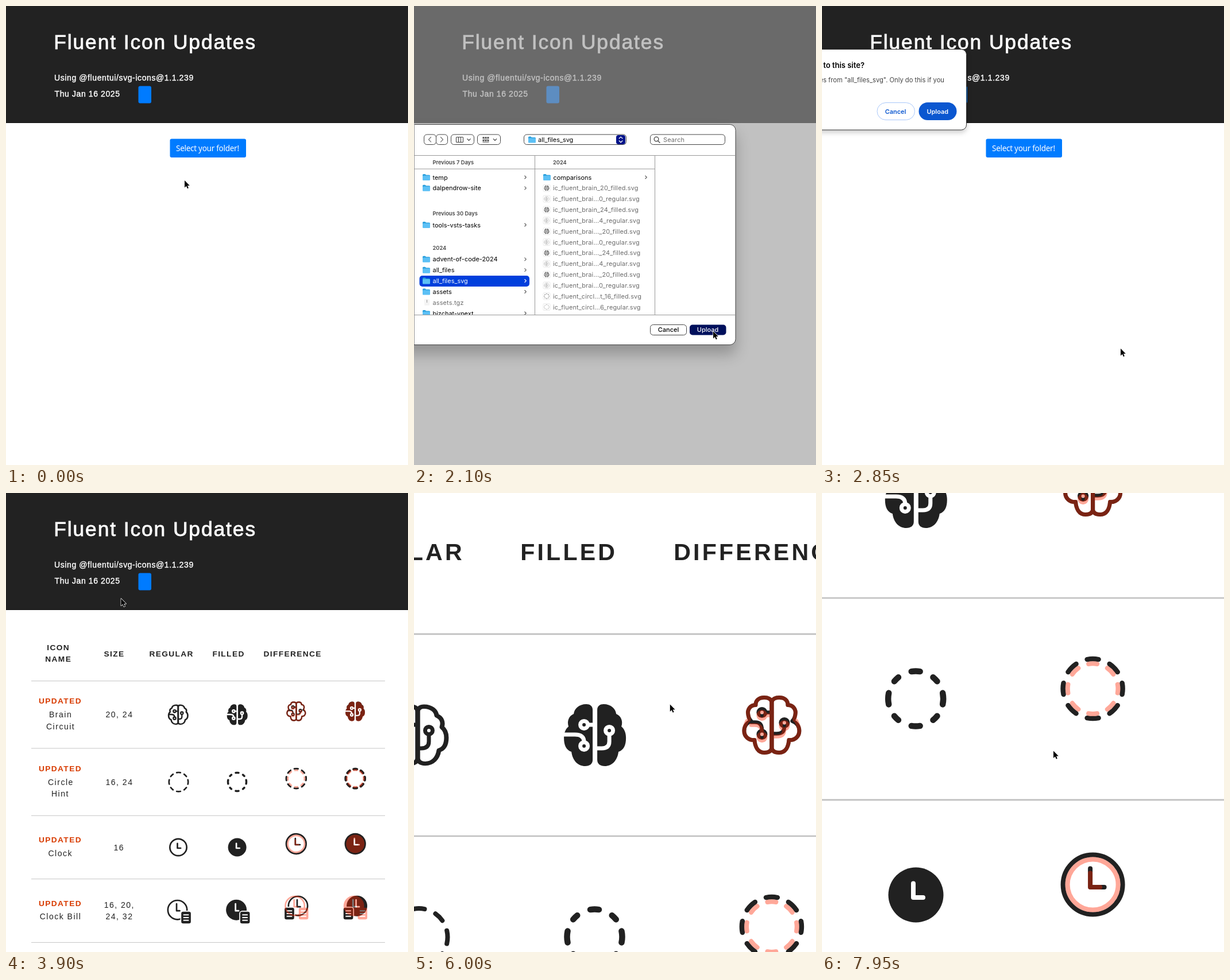
Write an HTML page that moves like this. It is 700 px wide and 800 px high and loops after 8000 ms.

```html
<!DOCTYPE html>
<html lang="en">
<head>
<meta charset="utf-8">
<title>Icon updates</title>
<style>
html, body { margin: 0; width: 100%; height: 100%; overflow: hidden; background: #fff; }
svg { display: block; width: 700px; height: 800px; }
text { white-space: pre; }
.page { font: 14px "Liberation Sans", Arial, sans-serif; letter-spacing: 1.5px; fill: #222; }
.page .b { font-size: 13.7px; font-weight: 700; letter-spacing: 1.4px; }
.page .head { fill: #fff; stroke: #fff; stroke-width: .4; letter-spacing: .6px; }
.page .title { font-size: 35.4px; letter-spacing: 1.9px; stroke-width: .8; }
.page .btn { font: 13.5px "Noto Sans", sans-serif; letter-spacing: -.27px; fill: #fff; }
.ui { font: 10.95px Inter, sans-serif; fill: #000; }
.ui .group { font-size: 9.3px; font-weight: 600; fill: #444; }
.ui .dim { fill: #6c6c6c; letter-spacing: .14px; }
.ui .mid { font-weight: 500; text-anchor: middle; }
.ui .end { text-anchor: end; }
.box { fill: #fff; stroke: #444; }
.line { fill: none; stroke: #444; stroke-width: 1.3; stroke-linecap: round; stroke-linejoin: round; }
</style>
</head>
<body>
<svg id="stage" viewBox="0 0 700 800" xmlns="http://www.w3.org/2000/svg"></svg>
<script>
const INK = '#212121', RED = '#ff2600', BLUE = '#007bff', ACCENT = '#003fdc';
const LOOP = 8000, STEP = 150;

const text = (x, y, s, cls = '') => `<text x="${x}" y="${y}" class="${cls}">${s}</text>`;
const rect = (x, y, w, h, r, attrs) =>
  `<rect x="${x}" y="${y}" width="${w}" height="${h}" rx="${r}" ${attrs}/>`;
const path = (d, attrs) => `<path d="${d}" ${attrs}/>`;
const stroke = (color, w) =>
  `fill="none" stroke="${color}" stroke-width="${w}" stroke-linecap="round" stroke-linejoin="round"`;
const move = (x, y, body, s = 1) => `<g transform="translate(${x} ${y}) scale(${s})">${body}</g>`;
const mirrored = half => half + `<g transform="scale(-1 1)">${half}</g>`;

// Icons are drawn around 0,0 at three times their size on the page.
const LOBE = 'M-4-44C-4-51-9-54-15-54C-28-54-36-46-37-37C-46-33-49-24-46-15C-52-10-54-3-54 5' +
  'C-54 18-50 26-41 29C-39 44-30 54-17 54C-9 54-4 50-4 43Z';

function circuit(color, right = 25) {
  const ring = (x, y) => `<circle cx="${x}" cy="${y}" r="6.5"/>`;
  return `<g fill="none" stroke="${color}" stroke-width="7">` +
    ring(-19, -18) + ring(-19, 19) + ring(right, -8) +
    `<path d="M-12-18h9M-56-1h21q16 0 16 13M${right}-1v12q0 12-13 12H0"/></g>`;
}
const brainFilled = color =>
  `<g fill="${color}">${mirrored(path(LOBE, ''))}</g>` + circuit('#fff');
const brainRegular = color =>
  mirrored(path(LOBE, `transform="translate(4 0) scale(1 .92)" ${stroke(color, 8)}`)) +
  `<clipPath id="inside"><path d="M-52-60H60V60H-52Z"/></clipPath><g clip-path="url(#inside)">${circuit(color, 19.5)}</g>`;

// Deeply lobed outline: notch is the depth between the side lobes, drop lowers the circuit.
function brainLobed(color, notch, drop) {
  const half = `M0-40C-1-46-7-48-13-48C-22-48-28-43-28-35C-38-35-43-26-41-18C-40-12-38-9 ${-notch}-7` +
    'C-44-4-48 3-48 10C-48 20-40 27-30 26C-29 38-24 48-13 48C-6 48-1 46 0 40Z';
  const ring = (x, y) => `<circle cx="${x}" cy="${y}" r="6.3"/>`;
  return mirrored(path(half, stroke(color, 7))) +
    `<g transform="translate(0 ${drop})" ${stroke(color, 6.5)}>` +
    ring(-17, -22) + ring(-17, 16) + ring(22, -4) +
    '<path d="M-10-22H0M-36-5h7q12 0 12 13M22 3q0 12-13 12H0"/></g>';
}

// lens: lengths of the side, diagonal and top dashes.
function hint(color, r, w, ...lens) {
  let d = '';
  for (let k = 0; k < 8; k++) {
    const len = lens[[0, 1, 2, 1][k % 4]] || lens[0];
    const a = k * Math.PI / 4, half = len / r / 2;
    const p = b => `${(r * Math.cos(b)).toFixed(2)} ${(r * Math.sin(b)).toFixed(2)}`;
    d += `M${p(a - half)}A${r} ${r} 0 0 1 ${p(a + half)}`;
  }
  return path(d, stroke(color, w));
}
const hands = (color, up, right) => path(`M-4.5 ${-up}V4.5H${right}`, stroke(color, 8));
const clockFilled = (color, r, up = 20, right = 12.5) =>
  `<circle r="${r}" fill="${color}"/>` + hands('#fff', up, right);
const clockRegular = (color, r, up = 20, right = 12.5) =>
  `<circle r="${r - 4}" fill="none" stroke="${color}" stroke-width="8"/>` + hands(color, up, right);
function bill(color, halo) {
  return (halo ? rect(-30, -36, 60, 72, 16, 'fill="#fff"') : '') +
    rect(-25, -31, 50, 62, 10, `fill="${color}"`) +
    path('M-12-14H12M-12 0H12M-12 14H12', stroke('#fff', 6));
}
const clockBill = (clock, color, flip = 1) =>
  move(-8 * flip, -8, clock(color, 54, 32, 12)) + move(37 * flip, 32, bill(color, color === INK));

const diff = (now, before) => now + `<g opacity=".4">${before}</g>`;
const icon = (x, y, body, s = 1) => move(x, y, body, s / 3);

const icons = [
  icon(299.8, 386.3, brainRegular(INK)),
  icon(402.7, 386.3, brainFilled(INK)),
  icon(505.3, 380.5, diff(brainLobed(INK, 36, 0), brainLobed(RED, 43, 5))),
  icon(608, 380.5, diff(brainFilled(INK), move(0, 1, brainFilled(RED))), .945),
  icon(300.5, 503.7, hint(INK, 50, 8, 23, 17, 20)),
  icon(402.5, 503.5, hint(INK, 48, 10.5, 20, 10, 15)),
  icon(505.3, 497.7, diff(hint(INK, 52, 8.5, 20), hint(RED, 43.8, 8, 15))),
  icon(608.2, 497.7, diff(hint(INK, 50, 13, 17), hint(RED, 44.5, 11, 14))),
  icon(300, 617.5, clockRegular(INK, 48)),
  icon(402.6, 617.5, clockFilled(INK, 48)),
  icon(505.3, 611.5, diff(clockRegular(INK, 56, 28, 20), clockRegular(RED, 48))),
  icon(608.2, 611.5, diff(clockFilled(INK, 56, 28, 20), clockFilled(RED, 48))),
  icon(301.2, 729.3, clockBill(clockRegular, INK)),
  icon(403.8, 729.3, clockBill(clockFilled, INK)),
  icon(505.8, 722.3, diff(clockBill(clockRegular, INK, -1), clockBill(clockRegular, RED))),
  icon(608.4, 722.3, diff(clockBill(clockFilled, INK, -1), clockBill(clockFilled, RED)))
].join('');

const headings = [[71.3, 273.8, 'ICON'], [68.3, 294.3, 'NAME'], [170.5, 284.5, 'SIZE'], [249.4, 284.5, 'REGULAR'],
  [359.4, 284.5, 'FILLED'], [448.4, 284.5, 'DIFFERENCE']].map(h => text(...h, 'b')).join('');
const cells = [[75, 391, 'Brain'], [70, 411.5, 'Circuit'], [173.5, 391, '20, 24'],
  [73, 508.5, 'Circle'], [79, 529, 'Hint'], [173.5, 508.5, '16, 24'],
  [73.5, 632.5, 'Clock'], [187.5, 622.5, '16'],
  [58.7, 743, 'Clock Bill'], [170.7, 722.5, '16, 20,'], [173.5, 743, '24, 32']].map(c => text(...c)).join('');
const updated = [367.3, 484.8, 609, 719.5]
  .map(y => `<text x="57" y="${y}" class="b" style="fill:#d83b01">UPDATED</text>`).join('');
const rules = path([327.6, 445, 562.3, 672.7, 783.4].map(y => `M44 ${y}H660`).join(''),
  'stroke="#c0c0c0" stroke-width=".9"');

const page = `<g id="page" class="page">
  <path d="M0 0H700V204H0Z" fill="#222"/><path d="M0 203.5H700" stroke="#151515"/>
  ${text(83.2, 75.2, 'Fluent Icon Updates', 'head title')}
  ${text(84, 129.8, 'Using @fluentui/svg-icons@1.1.239', 'head')}
  ${text(84.5, 158.1, 'Thu Jan 16 2025', 'head')}
  ${rect(230.5, 139.5, 22.5, 30, 3, `fill="${BLUE}"`)}
  <g id="pick">${rect(285.5, 231.5, 132.5, 32.5, 3, `fill="${BLUE}"`)}
    ${text(296, 252.8, 'Select your folder!', 'btn')}</g>
  <g id="table">${headings}${updated}${cells}${rules}${icons}</g></g>`;

const folder = (x, y) => move(x, y,
  path('M0 1.5Q0 0 1.5 0H4.5L6 1.5H11.5Q13 1.5 13 3V5H0Z', 'fill="#2a9fdc"') +
  rect(0, 2.8, 13, 8.2, 1.2, 'fill="#5cc0f5"'));
const chevron = (x, y, color = '#555') => path(`M${x - 1.2} ${y - 2.5}l2.5 2.5-2.5 2.5`, stroke(color, 1.1));
const down = (x, y) => path(`M${x - 2.7} ${y - 1.4}l2.7 2.8 2.7-2.8`, 'class="line"');
const box = (x, w, r = 5, y = 224, h = 17.5) => rect(x, y, w, h, r, 'class="box"');
const dir = (x, y, name, end) => folder(x, y - 9.5) + text(x + 17.5, y, name) + chevron(end, y - 4);

function thumb(x, y, body, opacity) {
  return rect(x, y, 12, 12, 2, 'fill="#fff" stroke="#e4e4e4" stroke-width=".8"') +
    `<g opacity="${opacity}">${move(x + 6, y + 6, body, .085)}</g>`;
}
const fileNames = ['brain_20_filled', 'brai...0_regular', 'brain_24_filled', 'brai...4_regular',
  'brai..._20_filled', 'brai...0_regular', 'brai..._24_filled', 'brai...4_regular',
  'brai..._20_filled', 'brai...0_regular', 'circl...t_16_filled', 'circl...6_regular'];
const files = fileNames.map((name, i) => {
  const y = 321.3 + i * 18.85, filled = name.endsWith('filled');
  const art = i > 9 ? hint(INK, 48, 12, 14) : filled ? brainFilled(INK) : brainRegular(INK);
  return thumb(225, y - 10, art, filled ? .6 : .35) + text(242, y, `ic_fluent_${name}.svg`, 'dim');
}).join('');

const sheet = `<g id="sheet" class="ui">
  ${rect(-30, 206.5, 590, 384, 10, 'class="box" style="filter:drop-shadow(0 16px 12px rgba(0,0,0,.24))"')}
  ${box(17.5, 21)}${box(38.5, 20)}${box(64.5, 40)}${box(110.5, 40)}${box(191.5, 178)}${box(411.5, 130)}
  ${path('M29.5 228.5l-4 4.2 4 4.2M46.5 228.5l4 4.2-4 4.2', 'class="line" style="stroke:#777"')}
  ${rect(73.5, 228.5, 12, 9, 1, 'class="line" style="stroke-width:1.1"')}
  ${path('M77.5 228.5v9M81.5 228.5v9', 'class="line" style="stroke-width:1.1"')}
  ${path('M119.5 229.5h11M119.5 234.8h11', 'stroke="#444" stroke-width="2.6" stroke-dasharray="3 1"')}
  ${path('M119.5 232.2h11M119.5 237.6h11', 'stroke="#444" stroke-width=".8"')}
  ${down(95.5, 233)}${down(141, 233)}
  ${folder(199, 227.5)}${text(216, 236.7, 'all_files_svg')}
  ${rect(352, 225, 16, 16, 4, 'id="knob"')}
  ${path('M357.3 230.8l2.8-2.7 2.8 2.7M357.3 235l2.8 2.7 2.8-2.7', 'id="arrows" class="line"')}
  ${path('M425 235.3l3 3', 'class="line"')}<circle cx="422" cy="232" r="3.8" class="line"/>
  ${text(434, 236.8, 'Search', 'dim')}
  ${path('M0 260.5H560M0 284H419.5M0 538.5H560M210.5 260.5V538M419.5 260.5V538M.5 206V590', 'stroke="#999" fill="none"')}
  <clipPath id="list"><path d="M0 261H560V538H0Z"/></clipPath>
  <g clip-path="url(#list)">
    ${rect(9.5, 470, 191.5, 19, 5, 'id="row"')}
    ${text(32.5, 276, 'Previous 7 Days', 'group')}${text(242, 276, '2024', 'group')}
    ${dir(15, 302.5, 'temp', 194)}${dir(15, 321.3, 'dalpendrow-site', 194)}
    ${text(32.5, 365.3, 'Previous 30 Days', 'group')}${dir(15, 385.5, 'tools-vsts-tasks', 194)}
    ${text(32.5, 425, '2024', 'group')}
    ${dir(15, 445.3, 'advent-of-code-2024', 194)}${dir(15, 464.2, 'all_files', 194)}
    <g id="rowText">${dir(15, 483, 'all_files_svg', 194)}</g>${dir(15, 502, 'assets', 194)}
    ${rect(18, 511, 9, 11, 1, 'fill="#f4f4f4"')}${path('M22.5 512v5', 'stroke="#999"')}
    ${text(32.5, 520.8, 'assets.tgz', 'dim')}${dir(15, 539.5, 'bizchat-vnext', 194)}
    ${dir(225, 302.5, 'comparisons', 404)}${files}
  </g>
  ${box(411.5, 63, 5, 555.5, 18)}${text(443, 568, 'Cancel', 'mid')}
  ${rect(480, 555.5, 63.5, 18, 5, 'id="upload"')}
  ${text(511.5, 568, 'Upload', 'mid').replace('<text', '<text id="uploadText"')}</g>`;

const confirmBox = `<g id="confirm" class="ui">
  ${rect(-30, 75.5, 281.5, 140.5, 9, 'fill="#fff" stroke="#333" style="filter:drop-shadow(0 4px 4px rgba(0,0,0,.2))"')}
  <text x="74" y="107.8" class="end" style="font-size:13px;font-weight:600">Upload files to this site?</text>
  <text x="213" y="132.7" class="end" style="font-size:11.2px;fill:#444">all files from "all_files_svg". Only do this if you</text>
  ${rect(96, 168.5, 65.5, 30, 15, 'fill="#fff" stroke="#a8c7fa"')}
  ${rect(168.5, 168, 66, 31, 15.5, 'fill="#0b57d0"')}
  <g style="font-weight:600"><text x="128" y="187.5" text-anchor="middle" fill="#0b57d0">Cancel</text>
  <text x="201.3" y="187.5" text-anchor="middle" fill="#fff">Upload</text></g></g>`;

const cursor = path('M0 0V12.4L2.9 9.8L4.9 14.2L6.8 13.3L4.9 9H8.8Z',
  'id="cursor" fill="#000" stroke="#fff" stroke-width="1.4" paint-order="stroke" stroke-linejoin="round"');

document.getElementById('stage').innerHTML = page +
  '<path id="shade" d="M0 0H700V800H0Z" fill="#999"/>' + sheet + confirmBox + cursor;

const el = id => document.getElementById(id);
const show = (id, on) => el(id).style.display = on ? '' : 'none';

// Linear value at time t through [time, ...values] keys.
function track(keys, t) {
  const i = keys.findIndex(k => k[0] > t);
  if (i === 0) return keys[0].slice(1);
  if (i < 0) return keys[keys.length - 1].slice(1);
  const a = keys[i - 1], b = keys[i], u = (t - a[0]) / (b[0] - a[0]);
  return a.slice(1).map((v, n) => v + (b[n + 1] - v) * u);
}

const pointer = [[150, 311, 304], [300, 325, 282], [450, 345, 252], [600, 351, 240], [900, 351, 240],
  [1050, 350, 248], [1200, 300, 300], [1350, 215, 390], [1500, 166, 440], [1650, 250, 480], [1800, 420, 545],
  [1950, 521, 567], [2400, 521, 567], [2850, 520, 597], [3000, 520, 597], [3150, 470, 520], [3450, 260, 230],
  [3600, 201, 184], [4050, 200, 184], [4200, 206, 235], [4500, 330, 640], [4650, 400, 658], [4800, 450, 600],
  [5100, 482, 454], [5250, 445.8, 368.5], [6750, 445.8, 368.5], [6900, 461, 372], [7050, 461, 372], [7650, 403, 449.5]];
const sheetOpen = [[600, 0], [750, .12], [900, .56], [1050, .9], [1200, 1], [2250, 1], [2400, .75], [2550, .25], [2700, 0]];
const zoom = [[5550, 1], [5700, 1.5], [5850, 2.4], [6000, 3]];
const panX = [[6150, 0], [6300, -60], [6450, -130], [6600, -151.3]];
const panY = [[7050, 0], [7200, -90], [7350, -250], [7500, -370], [7650, -415]];

function render(time) {
  const t = Math.floor(time % LOOP / STEP) * STEP;
  const [x, y] = track(pointer, t), [open] = track(sheetOpen, t), [s] = track(zoom, t);
  const tx = 446.5 * (1 - s) + track(panX, t)[0], ty = 368.5 * (1 - s) + track(panY, t)[0];
  el('page').setAttribute('transform', `translate(${tx} ${ty}) scale(${s})`);
  el('cursor').setAttribute('transform', `translate(${x} ${y})`);

  const tableOn = t >= 3900;
  show('pick', !tableOn);
  show('table', tableOn);
  show('confirm', t >= 2700 && t < 3750);

  show('sheet', open > 0);
  el('shade').setAttribute('opacity', .606 * open);
  el('sheet').setAttribute('opacity', Math.min(1, open * 3));
  el('sheet').setAttribute('transform', `translate(0 ${-25 * (1 - open)})`);

  const active = t >= 1050, pressed = t >= 2100;
  el('knob').setAttribute('fill', active ? '#00138a' : '#fff');
  el('arrows').style.stroke = active ? '#fff' : '#222';
  el('row').setAttribute('fill', active ? ACCENT : '#dcdcdc');
  el('rowText').style.fill = active ? '#fff' : '';
  el('rowText').lastElementChild.setAttribute('stroke', active ? '#fff' : '#555');
  el('upload').setAttribute('fill', pressed ? '#00105c' : active ? ACCENT : '#fff');
  el('upload').setAttribute('stroke', active ? 'none' : '#444');
  el('uploadText').style.fill = active ? '#fff' : '';
}

const start = performance.now();
function frame() {
  render(performance.now() - start);
  requestAnimationFrame(frame);
}
frame();
</script>
</body>
</html>
```
